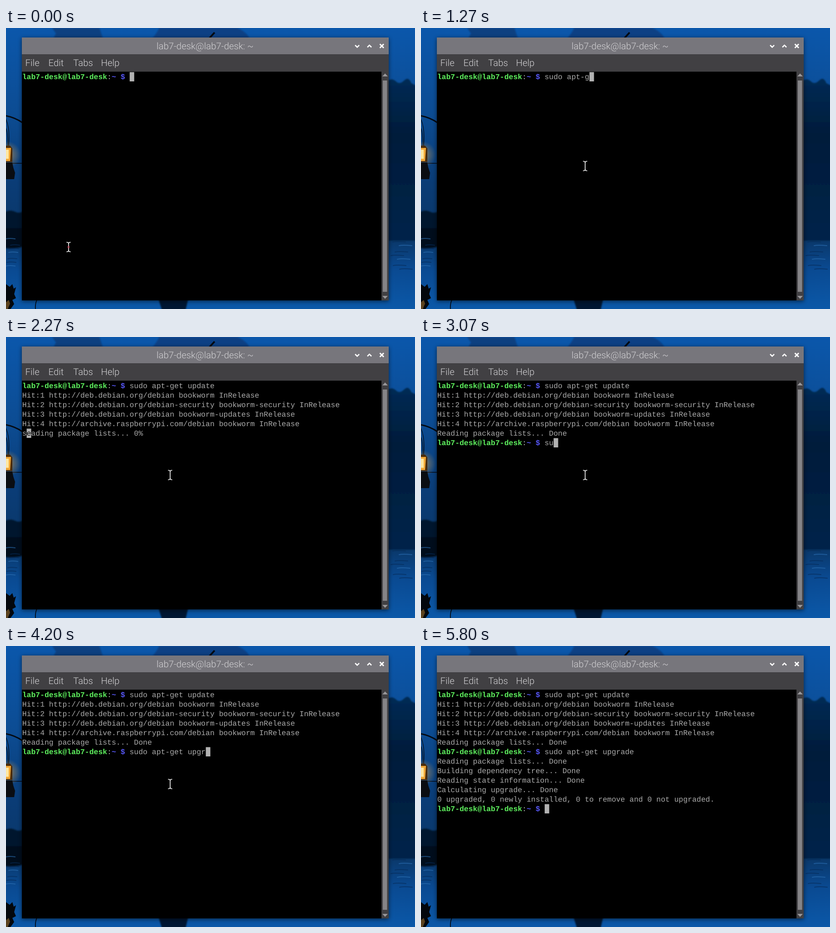
These frames come from a looping animation (902 px wide and 621 px high, 6270 ms). An HTML page:

```html
<!DOCTYPE html>
<html lang="en">
<head>
<meta charset="utf-8">
<title>Terminal</title>
<style>
  html, body { margin: 0; width: 100%; height: 100%; overflow: hidden; background: #0b4f9c; }
  svg { display: block; width: 100%; height: 100%; }
  text { white-space: pre; text-rendering: geometricPrecision; }
  .ui { font: 300 20.4px Roboto, "Open Sans", sans-serif; fill: #d2d1d4; }
  .term { font: 16.46px "Liberation Mono", "DejaVu Sans Mono", monospace; fill: #aaa; }
  .user { font-weight: bold; fill: #5ef05e; }
  .path { font-weight: bold; fill: #5656f4; }
</style>
</head>
<body>
<svg viewBox="0 0 902 621">
  <defs>
    <linearGradient id="sky" x2="0" y2="1">
      <stop offset="0" stop-color="#0b57ab"/>
      <stop offset=".3" stop-color="#0c4c93"/>
      <stop offset=".55" stop-color="#0a3c76"/>
      <stop offset=".75" stop-color="#0a3768"/>
      <stop offset=".86" stop-color="#0a4a92"/>
      <stop offset="1" stop-color="#0b58a8"/>
    </linearGradient>
    <linearGradient id="trees" x2="0" y2="1">
      <stop offset="0" stop-color="#062a55"/>
      <stop offset=".35" stop-color="#041c3a"/>
      <stop offset="1" stop-color="#04234a"/>
    </linearGradient>
    <radialGradient id="glow">
      <stop offset="0" stop-color="#ffb040" stop-opacity=".55"/>
      <stop offset="1" stop-color="#ffb040" stop-opacity="0"/>
    </radialGradient>
    <filter id="soft" x="-20%" y="-20%" width="140%" height="140%"><feGaussianBlur stdDeviation="1.6"/></filter>
    <filter id="shade" x="-5%" y="-5%" width="110%" height="110%"><feGaussianBlur stdDeviation="5"/></filter>
  </defs>

  <rect width="902" height="621" fill="url(#sky)"/>
  <g filter="url(#soft)">
    <path d="M102 0H206L214 24H104L110 12Z" fill="#0a3f80"/>
    <path d="M338 0H510Q530 8 538 24H322Q332 12 338 0Z" fill="#0a4084"/>
    <path d="M842 116Q852 110 860 118T878 116T894 122L906 128V470H842Z" fill="url(#trees)"/>
    <path d="M-4 408Q8 400 20 406T40 402V482H-4Z" fill="#04152d"/>
    <path d="M-4 442H40V482Q20 490 -4 486Z" fill="#03101f"/>
    <path d="M336 598H402L396 624H344Z" fill="#051831"/>
  </g>
  <g id="ripples" fill="none" stroke-width="2" stroke-linecap="round" opacity=".6"></g>

  <g fill="none" stroke="#040a12">
    <path d="M0 194Q20 198 36 209" stroke-width="3"/>
    <path d="M0 202Q9 222 6 262M0 222Q5 235 4 262" stroke-width="1.2"/>
    <path d="M0 299H36" stroke-width="1.5"/>
    <path d="M65 621Q64 610 68 601" stroke-width="1.8"/>
    <path d="M449 22L460 10" stroke-width="4"/>
  </g>
  <circle cx="3" cy="280" r="30" fill="url(#glow)"/>
  <path d="M0 260H9L14 266V296H0Z" fill="#4a2c0c"/>
  <path d="M0 265H11L9 294H0Z" fill="#f2a838"/>
  <path d="M0 269H6V289H0Z" fill="#ffe7a0"/>
  <path d="M0 297H14L16 308L20 320L18 334H0Z" fill="#0a0d12"/>
  <path d="M0 566L8 572L14 566L17 576L22 573L18 588L22 597L14 601L18 610L10 621H0Z" fill="#03070c"/>
  <path d="M0 606L6 601L9 609L4 621H0Z" fill="#5c431f"/>

  <rect x="35" y="23" width="809" height="581" opacity=".55" filter="url(#shade)"/>
  <rect x="35" y="21" width="809" height="581" fill="#414043"/>
  <rect x="35" y="21" width="809" height="37" fill="#77767c"/>
  <rect x="35" y="96.5" width="793" height="505.5"/>
  <rect x="831" y="116" width="9.5" height="467" fill="#858487"/>
  <path d="M830 107L836 100.500L842 107ZM830 592L836 598.500L842 592Z" fill="#98979a"/>
  <g fill="none" stroke="#fff" stroke-width="2.5">
    <path d="M770 38L774.500 42.500L779 38M797 42.500L801.500 38L806 42.500"/>
    <path d="M824.500 35.500L833 44M833 35.500L824.500 44" stroke-width="2.9"/>
  </g>
  <text id="title" class="ui" x="439" y="47.300" text-anchor="middle"></text>
  <g class="ui">
    <text x="42.500" y="84">File</text>
    <text x="93.500" y="84">Edit</text>
    <text x="148.300" y="84">Tabs</text>
    <text x="209.500" y="84">Help</text>
  </g>

  <g id="screen" class="term"></g>
  <rect id="caret" width="10" height="20.500" fill="#b2b2b2"/>
  <text id="under" class="term" style="fill:#000"></text>

  <g id="mouse" fill="none" stroke-linecap="round">
    <path id="beam" d="M-4 -10.500Q0 -10.500 0 -7Q0 -10.500 4 -10.500M0 -7V7M-4 10.500Q0 10.500 0 7Q0 10.500 4 10.500" stroke="#000" stroke-width="3.600"/>
    <use href="#beam" style="stroke:#fff"/>
    <path d="M-4 -10.500Q0 -10.500 0 -7Q0 -10.500 4 -10.500M0 -7V7M-4 10.500Q0 10.500 0 7Q0 10.500 4 10.500" stroke="#f0f0f0" stroke-width="1.700"/>
    <circle id="dot" r="2.600" fill="#c0304a" opacity=".6"/>
  </g>
</svg>
<script>
const LOOP = 6270, X0 = 35.7, CELL = 9.877, TOP = 97, LINE = 21, BASE = 15.5;
const HOST = 'lab7-desk', USER = HOST + '@' + HOST, PROMPT = 24;
const NS = 'http://www.w3.org/2000/svg';
const $ = id => document.getElementById(id);

function add(parent, tag, attrs = {}) {
  const el = document.createElementNS(NS, tag);
  for (const key in attrs) el.setAttribute(key, attrs[key]);
  return parent.appendChild(el);
}

// Text shown while the package lists load, with the caret column
function progress(t) {
  const head = 'eading package lists... ';
  if (t >= 2900) return ['R' + head + 'Done', 0];
  if (t >= 2470) return ['R' + head + (27 + 17 * Math.floor((t - 2470) / 65)) + '%', 0];
  return t >= 2270 ? ['s' + head + '0%', 1] : ['R' + head + '0%', 0];
}

// Prompt rows carry a command and [time, letters typed] marks
const rows = [
  { at: 0, enter: 1900, cmd: 'sudo apt-get update',
    marks: [[660, 0], [700, 1], [1030, 8], [1170, 9], [1270, 10], [1700, 19]] },
  { at: 2000, text: 'Hit:1 http://deb.debian.org/debian bookworm InRelease' },
  { at: 2070, text: 'Hit:2 http://deb.debian.org/debian-security bookworm-security InRelease' },
  { at: 2130, text: 'Hit:3 http://deb.debian.org/debian bookworm-updates InRelease' },
  { at: 2170, text: 'Hit:4 http://archive.raspberrypi.com/debian bookworm InRelease' },
  { at: 2230, live: progress },
  { at: 2900, enter: 4400, cmd: 'sudo apt-get upgrade',
    marks: [[2900, 1], [3440, 7], [3530, 8], [3600, 9], [3700, 10], [4070, 16], [4170, 17], [4350, 20]] },
  { at: 4470, text: 'Reading package lists... Done' },
  { at: 4670, text: 'Building dependency tree... Done' },
  { at: 4670, text: 'Reading state information... Done' },
  { at: 4870, text: 'Calculating upgrade... Done' },
  { at: 5100, text: '0 upgraded, 0 newly installed, 0 to remove and 0 not upgraded.' },
  { at: 5130, enter: LOOP, cmd: '', marks: [[0, 0]] }
];

function along(marks, t) {
  const i = marks.findIndex(m => m[0] > t);
  if (i === 0) return marks[0][1];
  if (i < 0) return marks[marks.length - 1][1];
  const [t0, a] = marks[i - 1], [t1, b] = marks[i];
  return a + (b - a) * (t - t0) / (t1 - t0);
}

rows.forEach((row, i) => {
  row.el = add($('screen'), 'text', { x: X0, y: TOP + BASE + LINE * i });
  const span = (text, cls = '') => {
    const el = add(row.el, 'tspan', { class: cls });
    el.textContent = text;
    return el;
  };
  if (row.marks) {
    span(USER, 'user');
    span(':');
    span('~ $ ', 'path');
  }
  row.tail = span(row.text || '');
});

$('title').textContent = USER + ': ~';
for (let i = 0; i < 14; i++) {
  const right = i % 2, y = 466 + i * 5 + i % 3 * 2;
  const x = right ? 846 + i * 7 % 23 : i * 5 % 12;
  add($('ripples'), 'path', {
    d: `M${x} ${y}q8 -2 ${right ? 28 : 20} 0`,
    stroke: i % 3 ? '#062b58' : '#2c70b4'
  });
}

function drawScreen(t) {
  let line = 0, col = 0, under = '';
  rows.forEach((row, i) => {
    const shown = t >= row.at;
    row.el.style.display = shown ? '' : 'none';
    if (!shown) return;
    line = i + 1;
    col = 0;
    under = '';
    if (row.marks) {
      const n = Math.floor(along(row.marks, t) + 1e-6);
      row.tail.textContent = row.cmd.slice(0, n);
      if (t < row.enter) [line, col] = [i, PROMPT + n];
    } else if (row.live) {
      const [text, at] = row.live(t);
      row.tail.textContent = text;
      [line, col, under] = [i, at, text[at]];
    }
  });
  const x = X0 + col * CELL, y = TOP + line * LINE;
  $('caret').setAttribute('x', x);
  $('caret').setAttribute('y', y + .5);
  $('under').setAttribute('x', x);
  $('under').setAttribute('y', y + BASE);
  $('under').textContent = under;
}

function drawMouse(t) {
  const clamp = v => Math.max(0, Math.min(1, v));
  const come = 1 - (1 - clamp((t - 70) / 370)) ** 2;
  const leave = clamp((t - 5590) / 170) ** 1.5;
  const x = 138 + 224 * come - 283 * leave;
  const y = 484 - 179 * come + 275 * leave;
  $('mouse').setAttribute('transform', `translate(${x} ${y})`);
  $('mouse').style.display = t < 5790 ? '' : 'none';
  $('dot').style.opacity = .6 * clamp((1030 - t) / 330);
}

const start = performance.now();
function tick() {
  const t = (performance.now() - start) % LOOP;
  drawScreen(t);
  drawMouse(t);
  requestAnimationFrame(tick);
}
tick();
</script>
</body>
</html>
```
